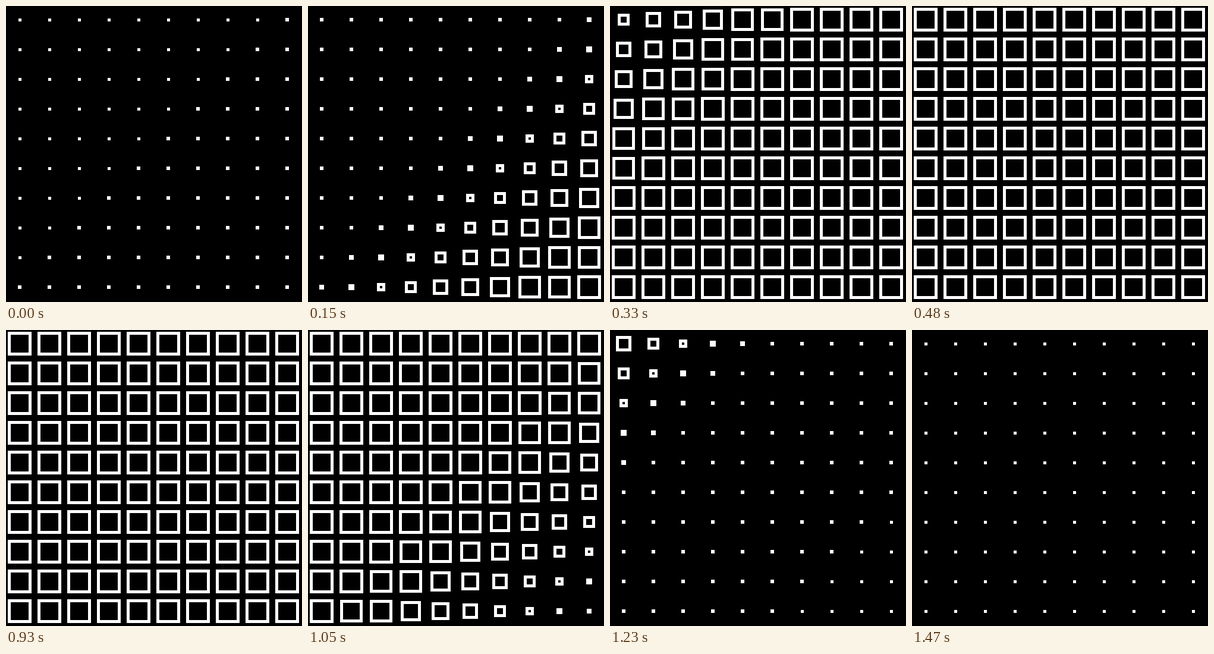
Write an HTML page with a canvas that moves like this. It is 498x498 px and loops after 1620 ms.

```html
<!DOCTYPE html>
<html lang="en">
<head>
<meta charset="utf-8">
<title>Square grid wave</title>
<style>
  html, body { margin: 0; width: 100%; height: 100%; overflow: hidden; background: #000; }
  canvas { display: block; }
</style>
</head>
<body>
<canvas id="stage" width="498" height="498"></canvas>
<script>
const ctx = document.getElementById('stage').getContext('2d');
const LOOP = 1620, TICK = 30;
const CELLS = 10, PITCH = 50, FIRST = 23;
const LINE = 5, MIN_HALF = 2.5, MAX_HALF = 20;
const WAKE = 9, MIDDLE = 22.5, SPAN = 15.6;

const easeInOutCubic = u => u < 0.5 ? 4 * u ** 3 : 1 - 4 * (1 - u) ** 3;
const clamp01 = u => Math.min(1, Math.max(0, u));

// Wave position at the top left cell; each diagonal shifts it by one.
function wave(t) {
  if (t < 930) return { pos: Math.min(t, 480) / 15, dir: 1 };
  if (t < 1110) return { pos: 49 - (t - 930) / 10, dir: -1 };
  return { pos: 31 - (t - 1110) / 15, dir: -1 };
}

function drawCell(x, y, phase) {
  ctx.fillStyle = '#fff';
  if (phase < WAKE) {
    ctx.fillRect(x - 2, y - 2, LINE, LINE);
    return;
  }
  const e = easeInOutCubic(clamp01((phase - MIDDLE) / SPAN + 0.5));
  const half = Math.max(3, Math.round(MIN_HALF + (MAX_HALF - MIN_HALF) * e));
  ctx.fillRect(x - half, y - half, 2 * half, 2 * half);
  const hole = half - LINE;
  if (hole > 0) {
    ctx.fillStyle = '#000';
    ctx.fillRect(x - hole, y - hole, 2 * hole, 2 * hole);
  }
}

function render(now) {
  const t = Math.floor((now % LOOP) / TICK) * TICK;
  const { pos, dir } = wave(t);
  ctx.fillStyle = '#000';
  ctx.fillRect(0, 0, 498, 498);
  for (let row = 0; row < CELLS; row++) {
    for (let col = 0; col < CELLS; col++) {
      drawCell(FIRST + col * PITCH, FIRST + row * PITCH, pos + dir * (row + col));
    }
  }
}

let start;
function frame(now) {
  start ??= now;
  render(now - start);
  requestAnimationFrame(frame);
}
render(0);
requestAnimationFrame(frame);
</script>
</body>
</html>
```
